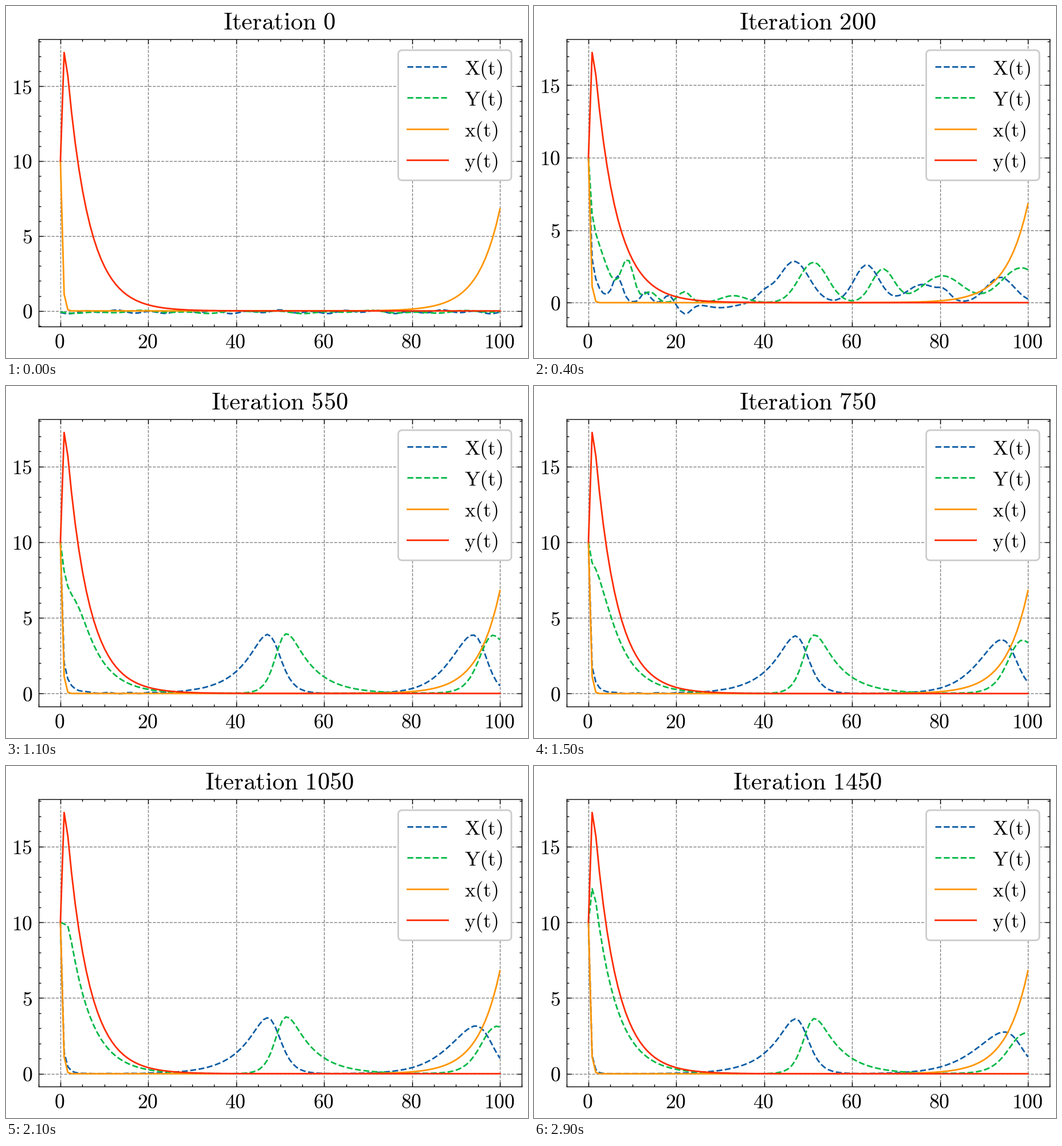
These frames come from a looping animation (911 px wide and 615 px high, 3000 ms). A matplotlib script:

```python
import numpy as np
import matplotlib.pyplot as plt
from matplotlib.animation import FuncAnimation
from matplotlib.patches import FancyBboxPatch
from matplotlib.ticker import FuncFormatter, MultipleLocator
from matplotlib.transforms import ScaledTranslation

W, H, DPI = 911, 615, 200
FONT = 12.8
EM = FONT * DPI / 72
FRAMES = 30
COLORS = ["#0C5DA5", "#00B945", "#FF9500", "#FF2C00"]
STYLES = ["--", "--", "-", "-"]
LABELS = ["X(t)", "Y(t)", "x(t)", "y(t)"]

plt.rcParams.update({
    "mathtext.fontset": "cm", "font.size": FONT, "axes.linewidth": 0.5,
    "lines.linewidth": 1.0, "axes.axisbelow": True,
})

t = np.linspace(0, 100, 120)
D = t[1]

# Reference solution
prey = 6.8 * np.exp(0.2 * (t - 100))
prey[:3] = 10, 1.12, 0.08
hunter = 15.7 * np.exp(-0.2 * (t - 2 * D))
hunter[:2] = 10, 17.25


def pulse(peak, height, rise, fall, flat=0, width=1):
    """Exponential rise and fall meeting in a rounded top of the given height."""
    u = (t - peak) / width
    a = (1 - flat) * fall / (rise + fall)
    b = (1 - flat) * rise / (rise + fall)
    return height / (a * np.exp(-rise * u) + b * np.exp(fall * u) + flat)


def bumps(*parts):
    """Sum of Gaussians given as (centre, height, width)."""
    return sum(h * np.exp(-((t - c) / w) ** 2) for c, h, w in parts)


def drop(rate, power):
    return 10 * np.exp(-rate * (t / D) ** power)


def decay(scale, width):
    """Exponential decay, held down to 10 at the start."""
    return scale * np.exp(-0.2 * t) - (scale - 10) * np.exp(-(t / width) ** 2)


def cycles(x_mid, y_mid, x_end, y_end, x_width, y_width):
    """The two oscillations; the ends are (peak, height)."""
    x = pulse(47.1, x_mid, .18, .53) + pulse(*x_end, .22, .55, .55, x_width)
    y = pulse(51.5, y_mid, .65, .18) + pulse(*y_end, .4, .2, .3, y_width)
    return np.array([x, y])


def ripple(size):
    return size * np.sin(1.3 * t) * np.exp(-((t - 14) / 12) ** 2)


untrained = np.array([
    -.06 - .08 * np.sin(.85 * t) - .05 * np.sin(.33 * t + 1),
    -.07 - .06 * np.sin(.25 * t) - .05 * np.sin(.6 * t),
])
wavy = np.array([
    drop(1.2, .6) + bumps(
        (6.6, 1.7, 1.5), (13, .75, 1.3), (18.3, .55, 1.3), (22, -.75, 2),
        (30, -.35, 5), (40, .55, 2.5), (46.8, 2.85, 4.8), (63.3, 2.6, 4),
        (76, 1.25, 5), (81, .5, 2), (93.7, 1.75, 4.5)),
    5 * np.exp(-t / .6) + bumps(
        (0, 5, 5), (8.9, 2.8, 2), (14, .75, 2), (21.8, .75, 2), (33, .48, 4),
        (51.2, 2.78, 4.6), (67, 2.3, 3.6), (80.5, 1.85, 6.5), (98.5, 2.4, 6.5)),
])
settling = cycles(3.65, 3.68, (93.6, 3.68), (98.7, 4.1), .85, .65) + [
    drop(1.35, .65) + bumps((7.5, .5, 1.8), (13, .15, 1.2), (19.5, .18, 1.2),
                            (25, .2, 1.5), (75, .2, 2)),
    4 * np.exp(-t) + bumps((0, 6, 13), (10, .3, 2), (21.5, .25, 1.5), (66, .15, 2)),
]
# Network output at a few steps
POSES = {
    0: untrained,
    4: wavy,
    7: settling,
    11: cycles(3.9, 3.95, (93.8, 3.87), (98.5, 3.85), .85, .8)
        + [drop(1.61, .55) + ripple(.04), decay(14.6, 3)],
    19: cycles(3.72, 3.8, (94.4, 3.27), (99.2, 3.25), 1, .9)
        + [drop(1.9, .62) + ripple(.02), decay(14.4, 1.35)],
    24: cycles(3.65, 3.7, (94.7, 2.99), (99.5, 2.97), 1.06, .95)
        + [drop(2.04, .72), decay(14.6, .77)],
    29: cycles(3.62, 3.65, (94.6, 2.76), (99.6, 2.69), 1.12, 1)
        + [drop(2.12, .77), decay(15.9, .67)],
}


def fit(i):
    """Network output at step i, blended between the two nearest poses."""
    a = max(k for k in POSES if k <= i)
    b = min(k for k in POSES if k >= i)
    u = (i - a) / (b - a) if b > a else 0
    return (1 - u) * POSES[a] + u * POSES[b]


def roman(s):
    return r"$\mathrm{%s}$" % s.replace(" ", r"\ ")


fig = plt.figure(figsize=((W + .01) / DPI, (H + .01) / DPI), dpi=DPI, facecolor="white")
left, top, right, bottom = 56.65, 58.4, 900.35, 560.5
ax = fig.add_axes([left / W, 1 - bottom / H, (right - left) / W, (bottom - top) / H])
ax.set_xlim(-5, 105)
for axis, major, minor in ((ax.xaxis, 20, 5), (ax.yaxis, 5, 1)):
    axis.set_major_locator(MultipleLocator(major))
    axis.set_minor_locator(MultipleLocator(minor))
    axis.set_major_formatter(FuncFormatter(lambda v, _: roman(f"{v:.0f}")))
ax.tick_params(which="both", direction="in", top=True, right=True, width=0.5)
ax.tick_params(which="major", length=3, pad=3.8)
ax.tick_params(which="minor", length=1.5)
ax.grid(True, color="k", alpha=0.5, linestyle="--", linewidth=0.5)
nudge = ScaledTranslation(-1.5 / DPI, 0, fig.dpi_scale_trans)
for label in ax.get_xticklabels():
    label.set_transform(label.get_transform() + nudge)
lines = [ax.plot(t, c, ls=s, color=k)[0]
         for c, s, k in zip((*fit(0), prey, hunter), STYLES, COLORS)]
title = fig.text(477.3 / W, 1 - 40.5 / H, "", fontsize=1.2 * FONT,
                 ha="center", va="baseline")

# Legend, laid out in pixels
key = fig.add_axes([0, 0, 1, 1])
key.set(xlim=(0, W), ylim=(H, 0))
key.axis("off")
key.add_patch(FancyBboxPatch((684.5, 77.2), 197.5, 227.4, fc="white", ec="0.8", lw=1,
                             boxstyle=f"round,pad=0,rounding_size={0.2 * EM}"))
for n, (label, style, color) in enumerate(zip(LABELS, STYLES, COLORS)):
    y = 106.4 + 54.1 * n
    key.plot([699.6, 699.6 + 2 * EM], [y, y], ls=style, color=color)
    key.text(800, y + 0.35 * EM + 1, roman(label), va="baseline")


def draw(i):
    curves = fit(i)
    for line, curve in zip(lines, curves):
        line.set_ydata(curve)
    low, high = min(0, curves.min()), hunter.max()
    pad = 0.05 * (high - low)
    ax.set_ylim(low - pad, high + pad)
    title.set_text(roman(f"Iteration {50 * i}"))
    return [*lines, title]


anim = FuncAnimation(fig, draw, frames=FRAMES, interval=100, repeat=True, blit=False)
plt.show()
```
